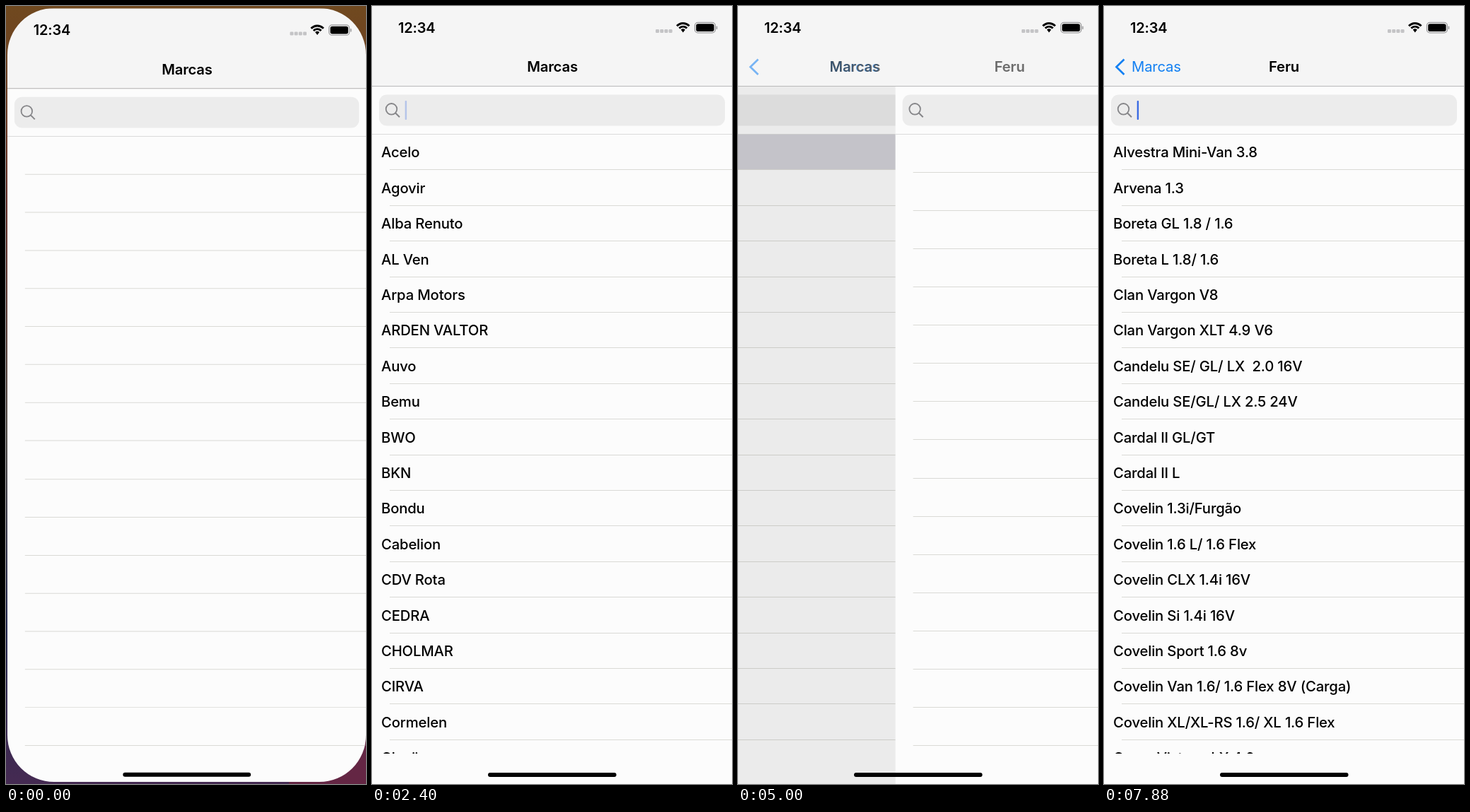
Recreate the animation shown at these times as an HTML page with a canvas. Size 509 by 1101 pixels, loop 8000 ms.

```html
<!DOCTYPE html>
<html lang="pt">
<head>
<meta charset="utf-8">
<style>
  html, body { margin: 0; width: 509px; height: 1101px; overflow: hidden; }
  canvas { display: block; }
</style>
</head>
<body>
<canvas id="stage" width="509" height="1101"></canvas>
<script>
const W = 509, H = 1101, LOOP = 8000;
const ctx = document.getElementById('stage').getContext('2d');

const BRANDS = ['Acelo', 'Agovir', 'Alba Renuto', 'AL Ven', 'Arpa Motors', 'ARDEN VALTOR',
  'Auvo', 'Bemu', 'BWO', 'BKN', 'Bondu', 'Cabelion', 'CDV Rota', 'CEDRA', 'CHOLMAR',
  'CIRVA', 'Cormelen', 'Clavëno'];
const F_BRANDS = ['Fandel', 'Fenica', 'Feru', 'Filbor', 'Fovani'];
const MODELS = ['Alvestra Mini-Van 3.8', 'Arvena 1.3', 'Boreta GL 1.8 / 1.6', 'Boreta L 1.8/ 1.6',
  'Clan Vargon V8', 'Clan Vargon XLT 4.9 V6', 'Candelu SE/ GL/ LX  2.0 16V',
  'Candelu SE/GL/ LX 2.5 24V', 'Cardal II GL/GT', 'Cardal II L', 'Covelin 1.3i/Furgão',
  'Covelin 1.6 L/ 1.6 Flex', 'Covelin CLX 1.4i 16V', 'Covelin Si 1.4i 16V',
  'Covelin Sport 1.6 8v', 'Covelin Van 1.6/ 1.6 Flex 8V (Carga)',
  'Covelin XL/XL-RS 1.6/ XL 1.6 Flex', 'Cravo Vistana LX 4.6'];

const STEP = 95;
const BURSTS = [[0, 1], [190, 2], [670, 8], [1540, 1], [1730, 1], [2210, 8], [3270, 3],
  [3650, 1], [4130, 9], [5000, 3], [5380, 1], [7690, 3]];

const clamp = v => Math.min(1, Math.max(0, v));

function heldTime(t) {
  const [start, count] = BURSTS.findLast(([s]) => t >= s);
  return start + Math.min(count - 1, Math.floor((t - start) / STEP)) * STEP;
}

function box(x, y, w, h, color, r = 0) {
  ctx.fillStyle = color;
  ctx.beginPath();
  ctx.roundRect(x, y, w, h, r);
  ctx.fill();
}

function line(color, width, ...points) {
  ctx.strokeStyle = color;
  ctx.lineWidth = width;
  ctx.beginPath();
  points.forEach(([x, y]) => ctx.lineTo(x, y));
  ctx.stroke();
}

function text(str, x, y, { weight = 450, size = 20.3, color = '#000', align = 'left' } = {}) {
  ctx.font = `${weight} ${size}px Inter, sans-serif`;
  ctx.letterSpacing = '-0.18px';
  ctx.fillStyle = color;
  ctx.textAlign = align;
  ctx.fillText(str, x, y);
  return ctx.measureText(str).width;
}

function withAlpha(alpha, draw) {
  ctx.save();
  ctx.globalAlpha = clamp(alpha);
  draw();
  ctx.restore();
}

// Caret opacity over a one second cycle
function blink(t, base) {
  const p = (((t - base) % 1000) + 1000) % 1000;
  return p < 400 ? 1 - clamp((p - 90) / 160) : clamp((p - 400) / 130);
}

function searchField(query, caret) {
  box(10, 125.5, 489, 44, '#ececec', 11);
  ctx.strokeStyle = '#858588';
  ctx.lineWidth = 1.8;
  ctx.beginPath();
  ctx.arc(27.5, 145.8, 7.8, 0, 7);
  ctx.stroke();
  line('#858588', 2, [33, 151.3], [39, 157.3]);
  let width = 0;
  if (query) {
    width = text(query, 48, 154.7, { weight: 400 });
    box(469.5, 137, 21, 21, '#88888b', 10.5);
    line('#fff', 1.9, [476, 143.5], [484, 151.5]);
    line('#fff', 1.9, [484, 143.5], [476, 151.5]);
  }
  withAlpha(caret, () => box(46.7 + width, 134, 2.4, 27, '#3b6be3', 1));
}

function page(x, { items = [], query = '', caret = 0, selected = false }) {
  const rowHeight = items.length ? 50.4 : 54.06, top = 181;
  ctx.save();
  ctx.translate(x, 0);
  box(0, 113, W, H - 113, '#fcfcfc');
  searchField(query, caret);
  if (selected) box(0, top, W, rowHeight, '#d2d1d7');
  box(0, top, W, 1, '#dadadb');
  for (let y = top + rowHeight; y < 1058; y += rowHeight) box(25, Math.round(y), W - 25, 1, '#dadad6');
  ctx.beginPath();
  ctx.rect(0, top, W, 1058 - top);
  ctx.clip();
  items.forEach((name, i) => text(name, 13, top + 33.3 + i * rowHeight));
  ctx.restore();
}

function statusBar() {
  text('12:34', 37, 38, { weight: 600, size: 20 });
  for (let i = 0; i < 4; i++) box(401 + i * 6.2, 33, 5, 5, '#c4c4c6', 1.3);
  ctx.strokeStyle = '#000';
  ctx.lineWidth = 2.9;
  for (const r of [12, 7.4]) {
    ctx.beginPath();
    ctx.arc(439.8, 36.5, r, -Math.PI * 0.76, -Math.PI * 0.24);
    ctx.stroke();
  }
  ctx.fillStyle = '#000';
  ctx.beginPath();
  ctx.moveTo(439.8, 37.5);
  ctx.arc(439.8, 36.5, 4.2, -Math.PI * 0.76, -Math.PI * 0.24);
  ctx.fill();
  ctx.strokeStyle = '#98989a';
  ctx.lineWidth = 1.2;
  ctx.beginPath();
  ctx.roundRect(456.4, 23.4, 29, 14.4, 4.4);
  ctx.stroke();
  box(458.2, 25.2, 25.4, 10.8, '#000', 2.8);
  box(486.6, 28.5, 1.7, 4.5, '#a0a0a2', 1);
}

function navBar(rest) {
  const blue = '#1480f2', semibold = { weight: 600 };
  box(0, 0, W, 113, '#f5f5f5');
  box(0, 113, W, 1, '#b9b9ba');
  if (rest === 1) {
    text('Marcas', 255, 93.4, { ...semibold, align: 'center' });
    return;
  }
  const left = 39 + 180 * rest ** 0.83;
  withAlpha(1 - rest, () => {
    text('Marcas', left, 93.4, { weight: 400, color: blue });
    line(blue, 2.7, [28.5, 75.5], [17.5, 86.3], [28.5, 97]);
    text('Feru', 254.5 + 296 * rest, 93.4, { ...semibold, align: 'center' });
  });
  withAlpha(rest * 1.3 - 0.02, () => text('Marcas', left, 93.4, semibold));
}

function brandsState(t) {
  if (t < 670) return {};
  if (t < 3300) return { items: BRANDS, caret: t < 760 ? 0 : blink(t, 1200) };
  const query = 'Fer'.slice(0, t < 3450 ? 1 : t < 3650 ? 2 : 3);
  return {
    items: F_BRANDS.filter(name => name.startsWith(query)),
    query,
    caret: blink(t, 4100),
    selected: t > 4780
  };
}

function modelsState(t) {
  return t < 7690 ? {} : { items: MODELS, caret: t < 7780 ? 0 : 1 };
}

// Share of the push transition still to go
function pushRest(t) {
  if (t >= 7690) return 0;
  const u = Math.max(0, t - 4875) * 0.0151;
  return (1 + u) * Math.exp(-u);
}

function wallpaper() {
  const g = ctx.createLinearGradient(0, 0, 0, H);
  [[0, '#70491f'], [0.25, '#66302a'], [0.55, '#55504c'], [0.8, '#242850'], [1, '#452a52']]
    .forEach(([at, color]) => g.addColorStop(at, color));
  box(0, 0, W, H, g);
  box(400, 900, 109, 201, '#642644');
}

function draw(t) {
  const rest = pushRest(t);
  const launch = t < 190 ? 1 : t < 280 ? 0.5 : 0;
  ctx.save();
  if (launch) {
    wallpaper();
    ctx.beginPath();
    ctx.roundRect(2 * launch, 3 * launch, W - 2 * launch, H - 6 * launch, 66 * launch);
    ctx.clip();
    ctx.translate(1.9 * launch, 3.6 * launch);
    ctx.scale(1 - 0.0035 * launch, 1 - 0.0035 * launch);
  }
  if (rest > 0) page(-0.3 * W * (1 - rest), brandsState(t));
  if (rest < 1) {
    box(0, 113, W, H - 113, `rgba(0,0,0,${0.12 * (1 - rest)})`);
    page(W * rest, modelsState(t));
  }
  navBar(rest);
  statusBar();
  box(164, 1085, 181.5, 6, '#000', 3);
  ctx.restore();
}

function tick() {
  draw(heldTime(performance.now() % LOOP));
  requestAnimationFrame(tick);
}
tick();
</script>
</body>
</html>
```
